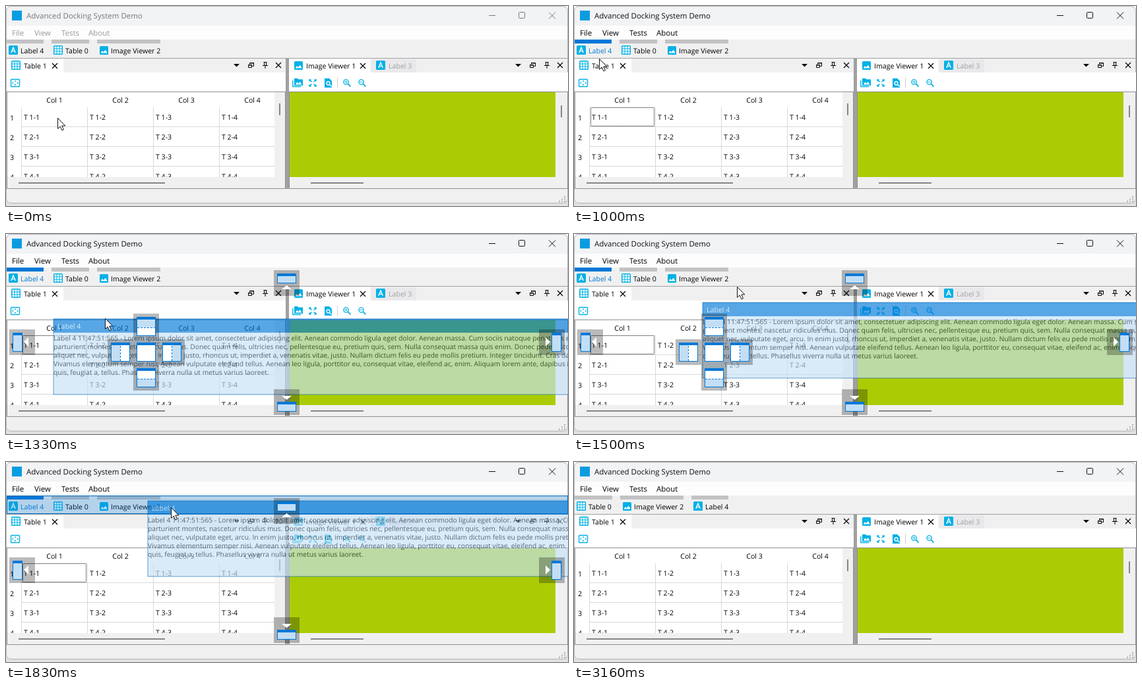
Recreate the animation shown at these times as an HTML page. Size 852 by 304 pixels, loop 3.66 s.

```html
<!DOCTYPE html>
<html lang="en">
<head>
<meta charset="utf-8">
<title>Docking demo</title>
<style>
html, body { margin: 0; width: 100%; height: 100%; overflow: hidden; background: #fff; }
svg { display: block; width: 852px; height: 304px; }
text { font: 10.6px "Open Sans", "Noto Sans", sans-serif; text-rendering: geometricPrecision; white-space: pre; }
.ui text { font-size: 11.5px; }
.lorem text { font-size: 10.3px; }
.mid { text-anchor: middle; }
.line { fill: none; stroke: currentColor; }
.bar { fill: #c2c2c4; }
.cyan { color: #00b0e6; }

.anim { animation: 3660ms step-end infinite; }
.title { animation-name: title; }
.menu { animation-name: menu; }
.hot { animation-name: hot; }
.hotbar { animation-name: hotbar; }
.before { animation-name: before; }
.after { animation-name: after; }
.focus { animation-name: focus; }
.drag { animation-name: drag; }
.popup { animation-name: popup; }
.cross { animation-name: cross; }
.strip { animation-name: strip; }
.ghost { animation-name: drag, ghost; }
.cursor { animation-name: cursor; }

@keyframes title { 0% { color: #777 } 27.32%, to { color: #111 } }
@keyframes menu { 0% { color: #999 } 27.32%, to { color: #000 } }
@keyframes hot { 0% { fill: #000 } 18.03%, to { fill: #0078d7 } }
@keyframes hotbar { 0% { fill: #c2c2c4 } 18.03%, to { fill: #0078d7 } }
@keyframes before { 0% { opacity: 1 } 63.66%, to { opacity: 0 } }
@keyframes after { 0% { opacity: 0 } 63.66%, to { opacity: 1 } }
@keyframes focus { 0% { opacity: 0 } 27.32% { opacity: 1 } 63.66%, to { opacity: 0 } }
@keyframes drag { 0% { opacity: 0 } 31.69% { opacity: 1 } 63.66%, to { opacity: 0 } }
@keyframes popup { 0% { opacity: 0 } 31.69% { opacity: 1 } 36.33%, to { opacity: 0 } }
@keyframes strip { 0% { opacity: 0 } 45.35% { opacity: 1 } 63.66%, to { opacity: 0 } }
@keyframes cross {
  0% { opacity: 0; transform: translate(205px, 179px) }
  31.69% { opacity: 1; transform: translate(205px, 179px) }
  36.33% { opacity: 1; transform: translate(212px, 179px) }
  45.35%, to { opacity: 0; transform: translate(212px, 179px) }
}
@keyframes ghost {
  0% { transform: translate(7px, 79px) }
  36.33% { transform: translate(72px, 129px) }
  40.98% { transform: translate(195px, 104px) }
  45.35% { transform: translate(212px, 65px) }
  50%, to { transform: translate(215px, 59px) }
}
@keyframes cursor {
  0% { opacity: 1; transform: translate(78px, 170px) }
  9.01% { opacity: 1; transform: translate(69px, 137px) }
  13.66% { opacity: 1; transform: translate(47px, 76px) }
  18.03% { opacity: 1; transform: translate(36px, 67px) }
  22.67% { opacity: 1; transform: translate(42px, 75px) }
  27.32% { opacity: 1; transform: translate(38px, 80px) }
  31.69% { opacity: 1; transform: translate(69px, 121px) }
  36.33% { opacity: 1; transform: translate(150px, 128px) }
  40.98% { opacity: 1; transform: translate(247px, 80px) }
  45.35% { opacity: 1; transform: translate(248px, 57px) }
  50% { opacity: 1; transform: translate(250px, 69px) }
  81.96% { opacity: 1; transform: translate(382px, 190px) }
  86.33%, to { opacity: 0; transform: translate(382px, 190px) }
}
</style>
</head>
<body>
<svg viewBox="0 0 852 304">
<defs>
  <g id="letter">
    <rect width="14" height="14" rx="1.5" fill="#00b0e6"/>
    <path d="M3.8 11 7 3l3.2 8M5 8.4h4" fill="none" stroke="#fff" stroke-width="1.4"/>
  </g>
  <g id="grid">
    <rect width="14" height="14" rx="1.5" fill="#00b0e6"/>
    <path d="M1.5 3h3m1 0h3m1 0h3M1.5 7h3m1 0h3m1 0h3M1.5 11h3m1 0h3m1 0h3" stroke="#fff" stroke-width="2.9"/>
  </g>
  <g id="photo">
    <rect width="13" height="13" rx="1.5" fill="#00b0e6"/>
    <path d="M1.5 10.5 4 7l2 2.3 2.7-3.8 3 5z" fill="#fff"/>
  </g>
  <path id="pin" class="line" d="M1.5.5h5m-4 0v5m3-5v5m1-5M0 5.5h8M4 6v4"/>
  <path id="close" class="line" d="m0 0 8 8M8 0 0 8" stroke-width="1.2"/>
  <g id="buttons">
    <path d="M345 88h9l-4.5 4.5z"/>
    <path class="line" d="M369.5 88.5v-2h6v5h-2M367.5 89.5h5v4h-5zM369 87h7M367 90h6"/>
    <use href="#pin" x="389" y="85"/>
    <use href="#close" x="409" y="86"/>
  </g>
  <g id="lens">
    <circle class="line" cx="4.5" cy="4.5" r="3.6" stroke-width="1.4"/>
    <path class="line" d="m7.3 7.3 4 4" stroke-width="1.8"/>
    <path class="line" d="M2.7 4.5h3.6"/>
  </g>
  <g id="floating">
    <rect width="851" height="115" fill="#fff"/>
    <rect width="851" height="21" fill="#0078d7"/>
    <g fill="#fff" color="#fff">
      <text x="6" y="15">Label 4</text>
      <use href="#pin" transform="matrix(0 1 -1 0 828 7)"/>
      <use href="#close" x="841" y="7"/>
    </g>
    <g id="lorem" class="lorem"></g>
  </g>
  <rect id="tint" width="851" height="115" fill="#0078d7" fill-opacity=".15"/>
  <linearGradient id="shade" x2="0" y2="1">
    <stop stop-color="#c4c4c4"/><stop offset="1" stop-color="#e6e6e6"/>
  </linearGradient>
  <clipPath id="frame"><rect width="852" height="300" rx="7"/></clipPath>
  <clipPath id="cells"><path d="M2 131h405v129H2z"/></clipPath>
</defs>

<path d="M0 290h852v14H0z" fill="url(#shade)"/>
<g clip-path="url(#frame)">
  <path d="M0 0h852v304H0z" fill="#f0f0f0"/>
  <path d="M0 0h852v30H0z" fill="#f2f3f5"/>
  <path d="M0 30h852v21H0z" fill="#fdfdfd"/>
</g>
<rect x=".5" y=".5" width="851" height="299" rx="7" fill="none" stroke="#b4b6ba"/>
<rect x="9" y="7" width="15" height="15" fill="#0a9ce0"/>

<g class="ui anim title" fill="currentColor">
  <text x="31" y="19">Advanced Docking System Demo</text>
  <path class="line" d="M732 14.5h10"/>
  <rect class="line" x="777.5" y="9.5" width="9" height="9" rx="1"/>
  <path class="line" d="m823 9.5 10 10m0-10-10 10"/>
</g>
<g class="ui anim menu" fill="currentColor">
  <text x="9" y="45">File</text><text x="43" y="45">View</text>
  <text x="84" y="45">Tests</text><text x="125" y="45">About</text>
</g>

<g class="anim before">
  <path class="anim hotbar" d="M1 51h56v6H1z"/>
  <path class="bar" d="M69 51h57v6H69zM138 51h96v6h-96z"/>
  <use href="#letter" x="4" y="60"/><text class="anim hot" x="22" y="72">Label 4</text>
  <use href="#grid" x="72" y="60"/><text x="90" y="72">Table 0</text>
  <use href="#photo" x="142" y="61"/><text x="159" y="72">Image Viewer 2</text>
</g>
<g class="anim after">
  <path class="bar" d="M1 51h57v6H1zM70 51h96v6H70zM178 51h56v6h-56z"/>
  <use href="#grid" x="4" y="60"/><text x="22" y="72">Table 0</text>
  <use href="#photo" x="74" y="61"/><text x="91" y="72">Image Viewer 2</text>
  <use href="#letter" x="181" y="60"/><text x="199" y="72">Label 4</text>
</g>

<path d="M424 79h5v199h-5z" fill="#a0a0a0"/>
<path d="M1 79.5h423M429 79.5h423" stroke="#a0a0a0"/>
<path d="M1 80h86v21H1zM1 101h423v30H1zM429 80h123v21H429zM429 101h423v30H429z" fill="#fff"/>
<path d="M554 81h68v20h-68z" fill="#e9e9ec"/>
<use href="#grid" x="8" y="83"/><text x="27" y="95">Table 1</text>
<use href="#close" x="70" y="87"/>
<use href="#photo" x="437" y="84"/><text x="455" y="95">Image Viewer 1</text>
<use href="#close" x="537" y="87"/>
<use href="#letter" x="561" y="83"/><text x="580" y="95" fill="#a0a0a4">Label 3</text>
<use href="#buttons"/><use href="#buttons" x="427"/>

<g class="cyan" fill="currentColor">
  <rect class="line" x="7.5" y="111.5" width="13" height="11" rx="1" stroke-width="1.4"/>
  <path d="m14 113 1.5 2h-3zM14 121l1.5-2h-3zM9 117l2-1.5v3zM19 117l-2-1.5v3z"/>
  <path class="line" d="M434.8 113v9.5H447" stroke-width="1.4"/>
  <path d="M437 110h5l1.5 1.5h6.5v9.5h-13z"/>
  <path d="m438.5 119.5 3-4 2 2.5 2-3 3 4.5z" fill="#fff"/>
  <path class="line" d="M460 114.5V112h2.5m5 0h2.5v2.5m0 5v2.5h-2.5m-5 0H460v-2.5M460 112l3.5 3.5m6.5-3.5-3.5 3.5m3.5 6.5-3.5-3.5m-6.5 3.5 3.5-3.5" stroke-width="1.5"/>
  <path d="M483 110h7l4 4v10h-11z"/>
  <circle cx="488.5" cy="117.5" r="2.5" fill="none" stroke="#fff" stroke-width="1.3"/>
  <path d="m490 119 3.5 3.5" stroke="#fff" stroke-width="1.3"/>
  <use href="#lens" x="511" y="111"/><path class="line" d="M515.5 113.7v3.6"/>
  <use href="#lens" x="534" y="111"/>
</g>
<path d="M502.5 109v16" stroke="#d0d0d0"/>

<path d="M2 131h405v129H2z" fill="#fff"/>
<g id="table" clip-path="url(#cells)"></g>
<rect class="anim focus" x="25.5" y="154.5" width="96" height="28" fill="none" stroke="#000" stroke-dasharray="1" stroke-dashoffset=".5"/>
<path d="M430 131h403v129H430z" fill="#abcc04"/>
<path d="M1.5 131v146.5h422V131M1 130.5h423M429.5 131v146.5H851.5V131M429 130.5h423" fill="none" stroke="#8c8f96"/>
<path d="M414 148h2v18h-2zM841 151h2v18h-2zM19 268h222v2H19zM462 268h80v2h-80z" fill="#858585"/>
<path d="M846 290h2m-2 3.5h2m-2 3.5h2m-6-3.5h2m-2 3.5h2m-6 0h2" stroke="#b0b0b0" stroke-width="2"/>

<g class="anim popup">
  <use href="#floating" x="1" y="79"/>
  <use href="#tint" x="1" y="79"/>
  <path d="M1 194h851v4H1z" fill="#f0f0f0"/>
</g>
<rect class="anim strip" x="1.5" y="51.5" width="850" height="27" fill="#0078d7" fill-opacity=".25" stroke="#0067b8"/>
<g class="anim ghost">
  <use href="#floating" opacity=".6"/>
  <use href="#tint" stroke="#0064b3" stroke-opacity=".6"/>
</g>
<rect class="anim popup" x="1.5" y="79.5" width="408" height="198" fill="#0078d7" fill-opacity=".25" stroke="#0063b1"/>
<g id="edges" class="anim drag"></g>
<g id="cross" class="anim cross"></g>
<path class="anim cursor" d="M.5.5v16l3.7-3.5 2.7 6 2.6-1.2-2.7-5.8h5z" fill="#fff" stroke="#111"/>
</svg>

<script>
const put = (id, html) => { document.getElementById(id).innerHTML = html; };
const rect = (x, y, w, h, attrs) => `<rect x="${x}" y="${y}" width="${w}" height="${h}" ${attrs}/>`;
const text = (x, y, s, cls = '') => `<text x="${x}" y="${y}" class="${cls}">${s}</text>`;
const range = n => [...Array(n).keys()];

put('lorem', [
  'Label 4 11:47:51:565 - Lorem ipsum dolor sit amet, consectetuer adipiscing elit. Aenean commodo ligula eget dolor. Aenean massa. Cum sociis natoque penatibus et magnis dis',
  'parturient montes, nascetur ridiculus mus. Donec quam felis, ultricies nec, pellentesque eu, pretium quis, sem. Nulla consequat massa quis enim. Donec pede justo, fringilla vel,',
  'aliquet nec, vulputate eget, arcu. In enim justo, rhoncus ut, imperdiet a, venenatis vitae, justo. Nullam dictum felis eu pede mollis pretium. Integer tincidunt. Cras dapibus.',
  'Vivamus elementum semper nisi. Aenean vulputate eleifend tellus. Aenean leo ligula, porttitor eu, consequat vitae, eleifend ac, enim. Aliquam lorem ante, dapibus in, viverra',
  'quis, feugiat a, tellus. Phasellus viverra nulla ut metus varius laoreet.'
].map((s, i) => text(0, 33 + 13 * i, s)).join(''));

put('table', range(4).map(c => {
  const x = 23 + 100 * c;
  const cells = range(4).map(r => text(x + 4, 173 + 30 * r, `T ${r + 1}-${c + 1}`));
  return `<path d="M${x + .5} 154v106" stroke="#d8d8d8"/>` + text(x + 50.5, 147, `Col ${c + 1}`, 'mid') + cells.join('');
}).join('') + range(4).map(r =>
  text(6, 174 + 30 * r, r + 1) + `<path d="M23 ${183.5 + 30 * r}h384" stroke="#d8d8d8"/>`
).join(''));

// Small window glyph, optionally with one shaded half.
const backing = (x, y) => rect(x, y, 39, 39, 'fill-opacity=".27"');
const pane = (x, y, w, h, body) =>
  rect(x + .5, y + .5, w - 1, h - 1, `fill="${body}" stroke="#0078d7"`) + rect(x, y, w, 4, 'fill="#0078d7"');
const arrow = d => `<path d="${d}" fill="#fff"/>`;
const pale = '#c2def5';

put('edges',
  backing(406, 55) + pane(411, 60, 29, 15, pale) + arrow('M418 84h15l-7.5-6z') +
  backing(406, 236) + pane(411, 255, 29, 15, pale) + arrow('M418 246h15l-7.5 6z') +
  backing(5, 145) + pane(10, 150, 15, 29, pale) + arrow('M34 157v14l-7-7z') +
  backing(808, 145) + pane(827, 150, 15, 29, pale) + arrow('M818 157v14l7-7z'));

const half = (dx, dy) => {
  const x = dx * 39 - 14, y = dy * 39 - 14;
  let s = backing(x - 5, y - 5) + pane(x, y, 29, 29, '#fff');
  if (dx) s += rect(dx < 0 ? x + 1 : x + 15, y + 4, 13, 24, `fill="${pale}"`);
  if (dy) s += rect(x + 1, dy < 0 ? y + 4 : y + 16, 27, 12, `fill="${pale}"`);
  const cut = dx ? `M${x + 14.5} ${y + 5}v23` : `M${x + 1} ${y + 16.5}h27`;
  return s + (dx || dy ? `<path d="${cut}" stroke="#0078d7" stroke-dasharray="3 2"/>` : '');
};
put('cross', half(0, 0) + half(-1, 0) + half(1, 0) + half(0, -1) + half(0, 1));
</script>
</body>
</html>
```
